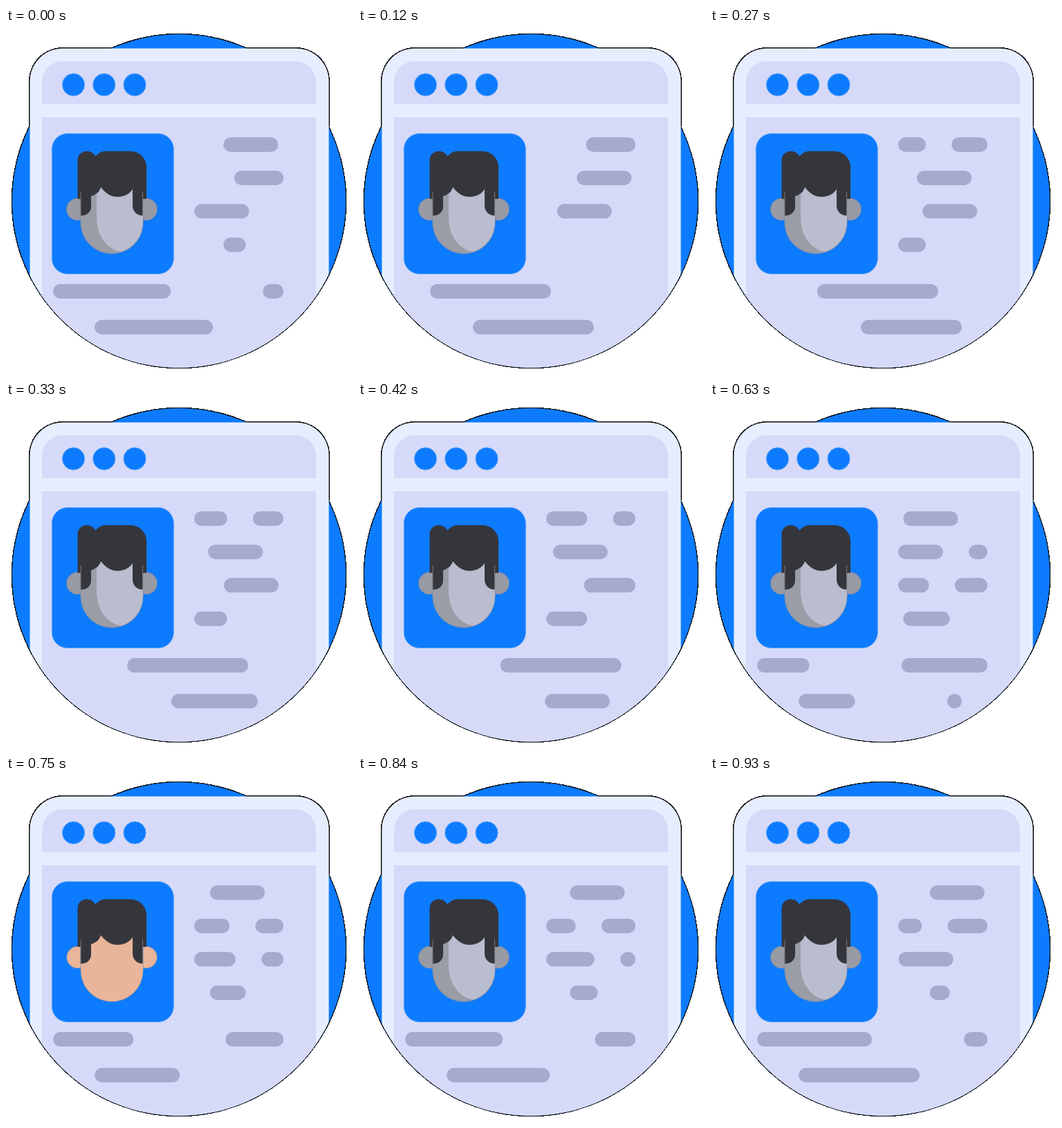
An HTML page that plays this animation: 500x500 px, repeating every 0.96 s.

```html
<!DOCTYPE html>
<html lang="en">
<head>
<meta charset="utf-8">
<title>Profile page</title>
<style>
  html, body { margin: 0; width: 100%; height: 100%; overflow: hidden; background: #fff; }
  svg { display: block; width: 100%; height: 100%; }

  .edge { fill: #0c0c0c; shape-rendering: crispEdges; }
  .blue { fill: #0d7bfd; }
  .soft { stroke: #6aaafb; stroke-width: 1; }
  .frame { fill: #e6edff; }
  .panel { fill: #d6daf8; }
  .hair { fill: #35363c; }
  .seam { fill: none; stroke: #77777c; stroke-width: 1; }

  .ear, .shade, .light { animation: tint 960ms step-end infinite; }
  .ear { --grey: #989aa4; }
  .shade { --grey: #9a9ca6; }
  .light { --grey: #b9bdcf; }
  .rim { fill: #7c8ba8; }

  /* Rows are dashed lines whose dashes travel along them. */
  .row {
    fill: none;
    stroke: #a5abcd;
    stroke-width: 21;
    stroke-linecap: round;
    stroke-dasharray: 58.2;
    animation: slide 960ms linear infinite;
  }
  .long { stroke-dasharray: 154; }
  .fwd { --a: -42px; --b: -139px; --c: -162px; }
  .back { --a: -58px; --b: 28px; --c: 45px; }
  .zero { --a: 0px; --b: -97px; --c: -116.8px; }
  .wide { --a: -303px; --b: -557px; --c: -607px; }
  .foot { --a: 4px; --b: -256px; --c: -308px; }

  @keyframes slide {
    0% { stroke-dashoffset: var(--a); }
    78.125% { stroke-dashoffset: var(--b); }
    96.875%, 100% { stroke-dashoffset: var(--c); }
  }
  @keyframes tint {
    0%, 81% { fill: var(--grey); }
    77% { fill: #e9b59a; }
    100% { fill: var(--grey); }
  }
</style>
</head>
<body>
<svg viewBox="0 0 500 500">
  <defs>
    <clipPath id="top"><rect width="500" height="142"/></clipPath>
    <clipPath id="badge">
      <path d="M0 0H500V250H491A241 241 0 0 1 9 250H0Z"/>
    </clipPath>
  </defs>

  <circle class="edge" cx="250" cy="250" r="242.3"/>
  <rect class="edge" x="33" y="28" width="435" height="300" rx="49" clip-path="url(#top)"/>
  <circle class="blue" cx="250" cy="250" r="241"/>

  <g clip-path="url(#badge)">
    <rect class="frame" x="34.5" y="29.5" width="432" height="520" rx="47.5"/>
    <path class="panel" d="M52 110V78A30 30 0 0 1 82 48H418A30 30 0 0 1 448 78V110Z"/>
    <rect class="panel" x="52" y="129" width="396" height="371"/>
  </g>

  <g class="blue soft">
    <circle cx="97.5" cy="82" r="16.2"/>
    <circle cx="141.8" cy="82" r="16.2"/>
    <circle cx="186" cy="82" r="16.2"/>
    <rect x="66.3" y="152.5" width="176" height="203" rx="22.5"/>
  </g>

  <g>
    <circle class="rim" cx="103.5" cy="262" r="16.3"/>
    <circle class="rim" cx="202.5" cy="262" r="16.3"/>
    <circle class="ear" cx="103.5" cy="262" r="15.3"/>
    <circle class="ear" cx="202.5" cy="262" r="15.3"/>
    <path class="rim" d="M107.5 240V281A45.5 45.5 0 0 0 198.5 281V240Z"/>
    <path class="shade" d="M108.3 225V281A44.7 44.7 0 0 0 197.7 281V225Z"/>
    <path class="light" d="M131 225V273C131 300 145 319 166 323.5A44.7 44.7 0 0 0 197.7 281V225Z"/>
    <path class="hair" d="M103.5 191A13 13 0 0 1 116.5 178C122 178 127 181 129.5 185.5C133 181 138 178 144 178H180A23 23 0 0 1 203 201V247H198V271H197A14 14 0 0 1 183 257V233C178 240 171 244 161 244C151 244 143 238 137 230C135 237 130 241 123 243V258A13 13 0 0 1 110 271H108V247H103.5Z"/>
    <path class="seam" d="M108 236V271M197.5 236V271"/>
  </g>

  <path class="row fwd" d="M282.5 168.5H390.5"/>
  <path class="row back" d="M282.5 216.7H390.5"/>
  <path class="row zero" d="M282.5 264.8H390.5"/>
  <path class="row fwd" d="M282.5 313.2H336"/>
  <path class="row long wide" d="M78.5 380.5H390.5"/>
  <path class="row long foot" d="M138.5 432.3H353.5"/>
</svg>
</body>
</html>
```
